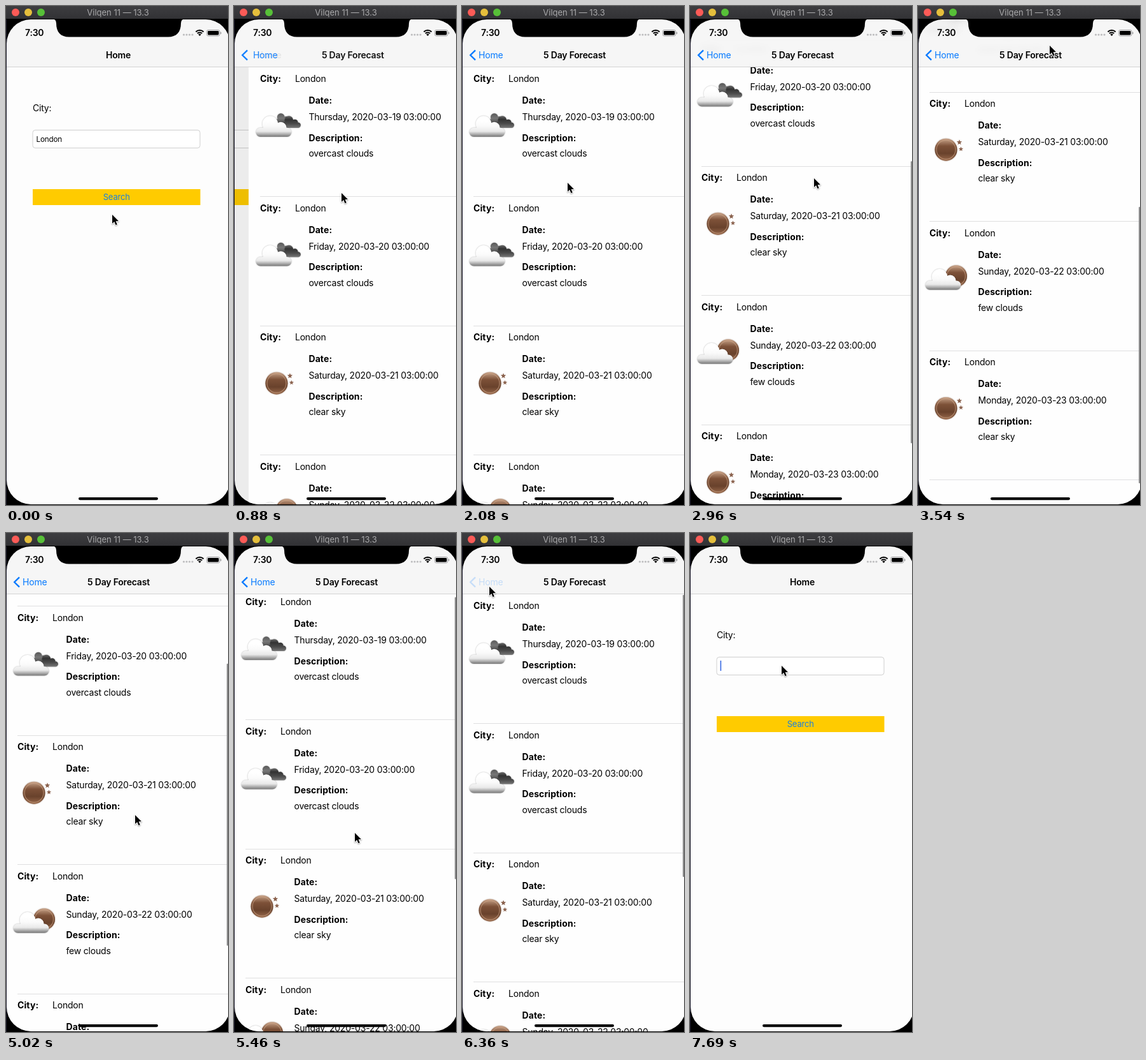
An HTML page with a canvas for the animation above (8 s loop, 349 by 782 pixels).

```html
<!DOCTYPE html>
<html lang="en">
<head>
<meta charset="utf-8">
<title>Forecast app</title>
<style>
  html, body { margin: 0; width: 100%; height: 100%; overflow: hidden; background: #000; }
  canvas { display: block; width: 349px; height: 782px; }
</style>
</head>
<body>
<canvas id="stage"></canvas>
<script>
const W = 349, H = 782, LOOP = 8000;
const NAV = 96, ROW = 202.6, SCREEN = 351, MAX_SCROLL = 357;
const FONT = 'Inter, "Open Sans", sans-serif';
const canvas = document.getElementById('stage');
const c = canvas.getContext('2d');
const ratio = window.devicePixelRatio || 1;
canvas.width = W * ratio;
canvas.height = H * ratio;

// Bursts of screen updates: start, end, number of updates.
const bursts = [[150, 1180, 8], [2080, 3100, 8], [3250, 4280, 8],
                [4720, 5760, 8], [5910, 6950, 8], [7100, 7690, 5]];

// Tracks: time followed by values.
const pointer = [
  [0, 167, 327], [300, 170, 303], [590, 170, 296], [1180, 168, 290],
  [2080, 166, 277], [2370, 180, 470], [2520, 186, 540], [2660, 189, 500],
  [2950, 195, 270], [3100, 198, 190], [3250, 201, 130], [3400, 205, 86],
  [3540, 207, 62], [3840, 210, 92], [4280, 215, 167], [4720, 212, 215],
  [4870, 207, 350], [5020, 203, 442], [5160, 200, 480], [5460, 190, 470],
  [5760, 140, 310], [5910, 95, 190], [6060, 62, 116], [6210, 46, 88],
  [6360, 43, 84], [6650, 46, 88], [6950, 100, 134], [7250, 136, 190],
  [7400, 144, 208]
];
const scrolling = [
  [2520, 0], [2660, 45], [2810, 140], [2950, 250], [3100, 340], [3250, 358],
  [3400, 371], [3540, 366], [3690, 361], [3840, 358], [3990, 357],
  [4720, 357], [4870, 268], [5020, 184], [5160, 92], [5310, 32], [5460, 6], [5610, 0]
];
const pushing = [
  [590, 0], [740, 0.6], [880, 0.93], [1030, 1],
  [6500, 1], [6650, 0.4], [6800, 0.07], [6950, 0]
];
const days = ['Thursday', 'Friday', 'Saturday', 'Sunday', 'Monday'];
const skies = ['overcast clouds', 'overcast clouds', 'clear sky', 'few clouds', 'clear sky'];

function snap(t) {
  let last = 0;
  for (const [a, b, n] of bursts) {
    if (t < a) break;
    const step = (b - a) / (n - 1);
    const i = Math.min(n - 1, Math.floor((t - a + 6) / step));
    last = Math.round((a + i * step) / 10) * 10;
  }
  return last;
}

function track(keys, t) {
  if (t <= keys[0][0]) return keys[0].slice(1);
  for (let i = 1; i < keys.length; i++) {
    const a = keys[i - 1], b = keys[i];
    if (t <= b[0]) {
      const k = (t - a[0]) / (b[0] - a[0]);
      return a.slice(1).map((v, j) => v + (b[j + 1] - v) * k);
    }
  }
  return keys[keys.length - 1].slice(1);
}

function text(s, x, y, { size = 14, weight = 400, color = '#000', align = 'left', gap = -0.2 } = {}) {
  c.font = `${weight} ${size}px ${FONT}`;
  c.letterSpacing = gap + 'px';
  c.textAlign = align;
  c.fillStyle = color;
  c.fillText(s, x, y);
}

function rect(x, y, w, h, color) {
  c.fillStyle = color;
  c.fillRect(x, y, w, h);
}

function pill(x, y, w, h, r, color) {
  c.beginPath();
  c.roundRect(x, y, w, h, r);
  c.fillStyle = color;
  c.fill();
}

function disc(x, y, r, color) {
  c.beginPath();
  c.arc(x, y, r, 0, Math.PI * 2);
  c.fillStyle = color;
  c.fill();
}

function within(x, y, w, h, draw) {
  c.save();
  c.beginPath();
  c.rect(x, y, w, h);
  c.clip();
  draw();
  c.restore();
}

function faded(alpha, draw) {
  c.save();
  c.globalAlpha *= alpha;
  draw();
  c.restore();
}

function shade(y, h, ...colors) {
  const g = c.createLinearGradient(0, y, 0, y + h);
  colors.forEach((col, i) => g.addColorStop(i / (colors.length - 1), col));
  return g;
}

function cloud(x, y, w, h, ...colors) {
  const base = h * 0.42;
  c.save();
  c.shadowColor = 'rgba(0,0,0,.3)';
  c.shadowBlur = 2 * ratio;
  c.beginPath();
  c.roundRect(x, y + h - base, w, base, base / 2);
  c.moveTo(x + w * 0.62, y + h * 0.4);
  c.arc(x + w * 0.4, y + h * 0.4, w * 0.22, 0, Math.PI * 2);
  c.moveTo(x + w * 0.86, y + h * 0.58);
  c.arc(x + w * 0.7, y + h * 0.58, w * 0.16, 0, Math.PI * 2);
  c.rect(x + w * 0.2, y + h * 0.5, w * 0.6, h * 0.3);
  c.fillStyle = shade(y, h, ...colors);
  c.fill();
  c.restore();
}

function whiteCloud(x, y, w, h) {
  cloud(x, y, w, h, '#fff', '#fff', '#fafafa', '#e9e9e9', '#777');
}

function moon(x, y, r) {
  c.save();
  c.shadowColor = 'rgba(90,50,25,.5)';
  c.shadowBlur = 2 * ratio;
  disc(x, y, r, shade(y - r, r * 2, '#c9a58b', '#7d5138', '#69422c', '#9a6a4c'));
  c.restore();
  c.beginPath();
  c.arc(x, y, r - 2.5, 0, Math.PI * 2);
  c.strokeStyle = 'rgba(205,165,135,.55)';
  c.lineWidth = 1.4;
  c.stroke();
}

function star(x, y, r) {
  c.beginPath();
  for (let i = 0; i < 10; i++) {
    const a = i * Math.PI / 5 - Math.PI / 2, d = i % 2 ? r * 0.45 : r;
    c.lineTo(x + d * Math.cos(a), y + d * Math.sin(a));
  }
  c.closePath();
  c.fillStyle = '#8c6450';
  c.fill();
}

function icon(sky, y) {
  if (sky === 'clear sky') {
    moon(44, y + 90, 17.5);
    star(65, y + 78.5, 4.4);
    star(67.5, y + 89, 3.8);
  } else if (sky === 'few clouds') {
    moon(60, y + 85.5, 17);
    whiteCloud(11.5, y + 73, 56, 34);
  } else {
    cloud(40, y + 71, 27, 18, '#555', '#777', '#444');
    cloud(51, y + 75, 31, 20, '#777', '#333', '#4a4a4a', '#777');
    whiteCloud(11.5, y + 75, 56, 34);
  }
}

function home(t) {
  rect(0, NAV, SCREEN + 1, H - NAV, '#fdfdfd');
  text('City:', 42, 165);
  c.beginPath();
  c.roundRect(42, 194.5, 263, 28, 4);
  c.fillStyle = '#fff';
  c.fill();
  c.strokeStyle = '#cfcfcf';
  c.lineWidth = 1;
  c.stroke();
  if (t < 7400) text('London', 47.5, 212.5, { size: 11.7 });
  else rect(47.5, 200, 1.7, 16, '#3f6fe3');
  rect(42, 287, 263.5, 25, '#ffcb00');
  const pressed = t >= 440 && t < 590;
  faded(pressed ? 0.2 : 1, () =>
    text('Search', 173.7, 304, { size: 13, color: '#1a80e0', align: 'center' }));
}

function rows(scroll) {
  days.forEach((day, i) => {
    const y = NAV + i * ROW - scroll;
    if (y > H || y < -ROW) return;
    const bold = { weight: 700, gap: 0.1 };
    text('City:', 18, y + 23, bold);
    text('London', 73, y + 23);
    text('Date:', 94.5, y + 57, bold);
    text(`${day}, 2020-03-${19 + i} 03:00:00`, 94.5, y + 83);
    text('Description:', 94.5, y + 115.5, bold);
    text(skies[i], 94.5, y + 140);
    icon(skies[i], y);
    rect(18, Math.round(y + ROW - 0.6), SCREEN, 1, '#dfdfe0');
  });
}

function list(t, scroll) {
  rect(0, NAV, SCREEN + 1, H - NAV, '#fefefe');
  rows(scroll);
  if (t >= 2660 && t < 6500) {
    const over = Math.max(0, scroll - MAX_SCROLL);
    const top = 97 + 0.585 * Math.min(scroll, MAX_SCROLL) + over;
    pill(347, top, 2.6, Math.min(442, 748 - top), 1.2, '#8f8f90');
  }
}

function status() {
  text('7:30', 30, 47, { weight: 600 });
  for (let i = 0; i < 4; i++) disc(279.5 + i * 4.5, 45, 1.6, '#bdbdbf');
  c.strokeStyle = '#000';
  c.lineWidth = 2;
  for (const r of [5.2, 8.6]) {
    c.beginPath();
    c.arc(304.5, 46.6, r, -Math.PI * 0.75, -Math.PI * 0.25);
    c.stroke();
  }
  c.beginPath();
  c.moveTo(304.5, 47);
  c.arc(304.5, 47, 3.2, -Math.PI * 0.75, -Math.PI * 0.25);
  c.fillStyle = '#000';
  c.fill();
  c.beginPath();
  c.roundRect(315.5, 37.5, 20.5, 9.5, 2.6);
  c.strokeStyle = '#a3a3a5';
  c.lineWidth = 1;
  c.stroke();
  pill(317, 39, 17.5, 6.5, 1.4, '#000');
  pill(337, 40.5, 1.4, 3.6, 0.7, '#a3a3a5');
}

function navBar(t, p, scroll) {
  rect(0, 21, SCREEN + 1, NAV - 21, '#f6f6f6');
  if (p === 1 && scroll > 0) {
    within(1, 21, SCREEN, NAV - 21, () => faded(0.05, () => {
      c.filter = 'blur(5px)';
      rows(scroll);
    }));
  }
  rect(0, 95, SCREEN + 1, 1, '#d2d2d3');
  const title = { weight: 600, align: 'center' };
  faded(1 - p, () => text('Home', 176.5 - 130 * p, 82, title));
  const pressed = t >= 6360 && t < 6650;
  faded(p * (pressed ? 0.2 : 1), () => {
    c.beginPath();
    c.moveTo(21, 69.3);
    c.lineTo(13.2, 77);
    c.lineTo(21, 84.7);
    c.strokeStyle = '#067aff';
    c.lineWidth = 2.4;
    c.stroke();
    text('Home', 26 + 60 * (1 - p), 82, { color: '#067aff' });
  });
  faded(p, () => text('5 Day Forecast', 177 + 150 * (1 - p), 82, title));
}

function notch() {
  c.beginPath();
  c.moveTo(73, 20);
  c.quadraticCurveTo(79, 21, 79, 27);
  c.bezierCurveTo(79, 41, 86, 48.5, 99, 48.5);
  c.lineTo(255, 48.5);
  c.bezierCurveTo(268, 48.5, 275, 41, 275, 27);
  c.quadraticCurveTo(275, 21, 281, 20);
  c.closePath();
  c.fillStyle = '#000';
  c.fill();
}

function titleBar() {
  rect(0, 0, W, 20, shade(0, 20, '#3d3d40', '#323235'));
  rect(0, 20, W, 1, '#000');
  ['#fc5b57', '#e5bf3c', '#57c038'].forEach((col, i) => disc(15 + i * 20, 10, 6, col));
  text('Vilqen 11 — 13.3', 176, 15, { size: 13, color: '#a9a9ab', align: 'center', gap: 0 });
}

function arrow(x, y) {
  c.save();
  c.translate(x, y);
  c.beginPath();
  c.moveTo(0, 0);
  for (const [px, py] of [[0, 14], [3.2, 11], [5.5, 16.2], [7.8, 15.2], [5.6, 10.2], [10, 10]]) c.lineTo(px, py);
  c.closePath();
  c.shadowColor = 'rgba(0,0,0,.35)';
  c.shadowBlur = 2 * ratio;
  c.shadowOffsetY = ratio;
  c.lineJoin = 'round';
  c.strokeStyle = '#fff';
  c.lineWidth = 2;
  c.stroke();
  c.shadowColor = 'transparent';
  c.fillStyle = '#000';
  c.fill();
  c.restore();
}

function page(dx, draw) {
  c.save();
  c.translate(dx, 0);
  draw();
  c.restore();
}

function render(t) {
  const [p] = track(pushing, t), [scroll] = track(scrolling, t);
  c.setTransform(ratio, 0, 0, ratio, 0, 0);
  rect(0, 0, W, H, '#000');
  rect(0, 21, 1, H, '#1b1a2b');
  c.save();
  c.beginPath();
  c.roundRect(1, 21, SCREEN, 760, 38);
  c.clip();
  within(0, NAV, W, H - NAV, () => {
    if (p < 1) page(-0.3 * SCREEN * p, () => home(t));
    if (p > 0 && p < 1) rect(0, NAV, W, H - NAV, `rgba(0,0,0,${0.07 * p})`);
    if (p > 0) page(SCREEN * (1 - p), () => list(t, scroll));
  });
  navBar(t, p, scroll);
  status();
  pill(114, 770, 125, 4.2, 2.1, '#000');
  c.restore();
  notch();
  titleBar();
  arrow(...track(pointer, t));
}

function tick() {
  render(snap(performance.now() % LOOP));
  requestAnimationFrame(tick);
}
tick();
</script>
</body>
</html>
```
